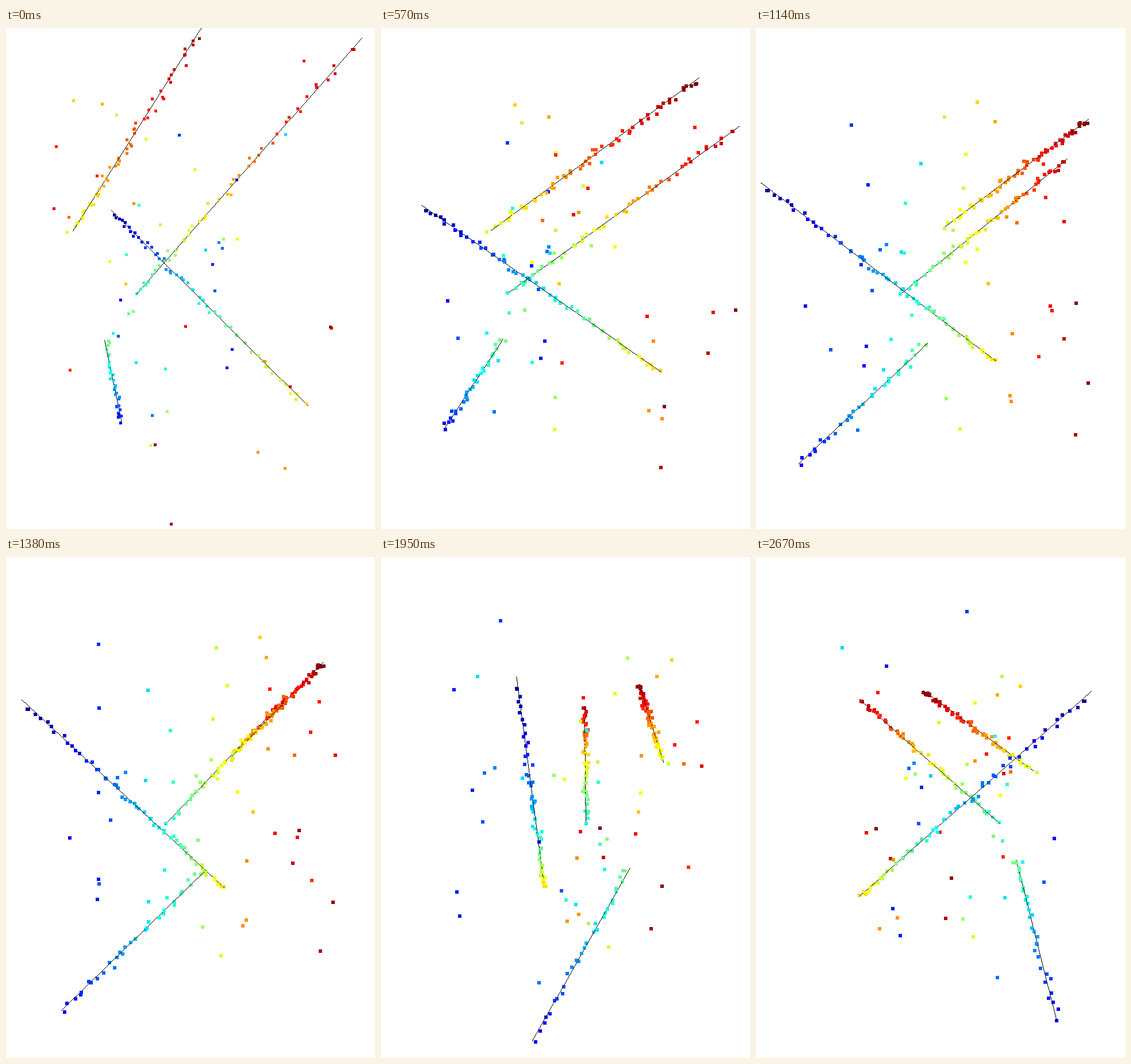
An HTML page with a canvas that plays this animation: 642x872 px, repeating every 2.7 s.

```html
<!DOCTYPE html>
<html lang="en">
<head>
<meta charset="utf-8">
<title>Rotating point cloud</title>
<style>
  html, body { margin: 0; width: 100%; height: 100%; overflow: hidden; background: #fff; }
  canvas { display: block; }
</style>
</head>
<body>
<canvas id="stage" width="642" height="872"></canvas>
<script>
const ctx = document.getElementById('stage').getContext('2d');
const STEP = 30, STEPS = 90;   // ms per step, steps per loop
const TURN = 0.036;            // radians per step
const FOCAL = 755, DEPTH = 244;
const CX = 324, CY = 437;

// Line ends in space: x right, y down, z to the viewer
const lines = [
  { a: [-171, -69, 38], b: [28, -270, 246], count: 58 },
  { a: [-91, 25, -49], b: [171, -243, 223], count: 47 },
  { a: [-167, -142, -238], b: [154, 169, 82], count: 56 },
  { a: [-132, 92, 6], b: [-139, 280, -193], count: 30 }
];

// Outermost strays; the others are scattered between them
const corners = [
  [-158, -238, 81], [-24, -271, -158], [126, -245, 172], [-139, 41, -182],
  [117, 239, 113], [-21, 248, 221], [-36, 161, 238], [135, 47, 237]
];
const STRAYS = 40;

let seed = 11;
function random() {
  seed = (seed * 1664525 + 1013904223) % 4294967296;
  return seed / 4294967296;
}
const mix = (a, b, t) => a + (b - a) * t;
const between = (a, b) => mix(a, b, random());
const jitter = () => between(-3, 3) + between(-3, 3) + between(-3, 3);

function jet(z) {
  const v = Math.min(1, Math.max(0, (z / DEPTH + 1) / 2));
  const band = c => Math.round(255 * Math.min(1, Math.max(0, 1.5 - Math.abs(4 * v - c))));
  return `rgb(${band(3)},${band(2)},${band(1)})`;
}

const cloud = [...corners];
for (let i = 0; i < STRAYS; i++)
  cloud.push([between(-165, 165), between(-260, 250), between(-185, 225)]);
for (const { a, b, count } of lines)
  for (let i = 0; i < count; i++) {
    const t = (i + random()) / count;
    cloud.push(a.map((v, k) => mix(v, b[k], t) + jitter()));
  }
const dots = cloud.map(p => ({ p, color: jet(p[2]) }));

function camera(step) {
  const cos = Math.cos(step * TURN), sin = Math.sin(step * TURN);
  const distance = step ? 755 : 660;   // opens closer, then cuts to the wide view
  return ([x, y, z]) => {
    const far = distance - z * cos + x * sin, s = FOCAL / far;
    return { x: CX + (x * cos + z * sin) * s, y: CY + y * s, far };
  };
}

function draw(step) {
  const project = camera(step), size = step ? 6 : 5;
  const marks = dots.map(({ p, color }) => ({ ...project(p), size, color }));
  for (const line of lines) {
    const a = project(line.a), b = project(line.b);
    const n = Math.ceil(Math.max(Math.abs(b.x - a.x), Math.abs(b.y - a.y)));
    for (let i = 0; i <= n; i++) {
      const t = i / n;
      marks.push({ x: mix(a.x, b.x, t), y: mix(a.y, b.y, t),
        far: 1 / mix(1 / a.far, 1 / b.far, t), size: 1, color: '#000' });
    }
  }
  marks.sort((m, n) => n.far - m.far);
  ctx.fillStyle = '#fff';
  ctx.fillRect(0, 0, 642, 872);
  for (const m of marks) {
    ctx.fillStyle = m.color;
    ctx.fillRect(Math.round(m.x - m.size / 2), Math.round(m.y - m.size / 2), m.size, m.size);
  }
}

let start, last = -1;
function tick(now) {
  start ??= now;
  const step = Math.floor((now - start) / STEP) % STEPS;
  if (step !== last) draw(last = step);
  requestAnimationFrame(tick);
}
draw(0);
requestAnimationFrame(tick);
</script>
</body>
</html>
```
